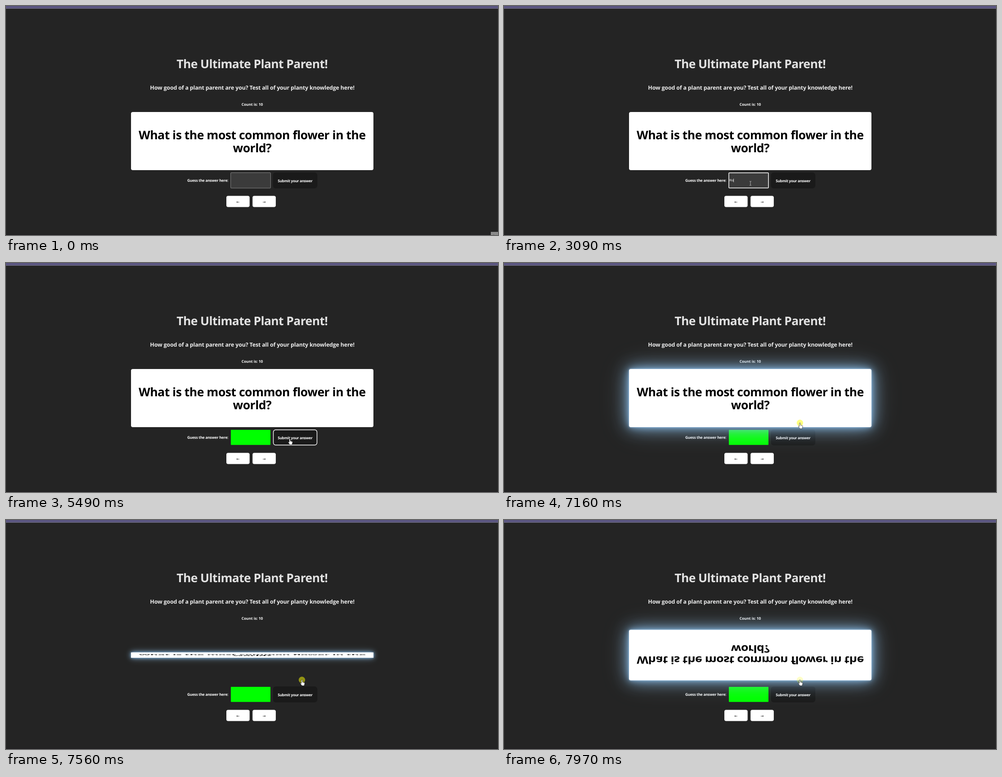
An HTML page for the animation above (8000 ms loop, 1094x512 px).

```html
<!DOCTYPE html>
<html lang="en">
<head>
<meta charset="utf-8">
<title>Plant quiz</title>
<style>
  html, body { margin: 0; width: 100%; height: 100%; overflow: hidden; background: #242424; }
  svg { position: absolute; left: 0; top: 0; width: 1094px; height: 512px; }
  body { font: 700 8.28px "Open Sans", "Noto Sans", sans-serif; text-rendering: geometricPrecision; }
  text { fill: #fff; }
  .mid { text-anchor: middle; }
  #title { font-size: 26.5px; letter-spacing: -.023em; fill: #e2e2e2; }
  #subtitle { font-size: 12.42px; letter-spacing: -.0125em; fill: #eee; }
  #prompt { letter-spacing: -.028em; }
  #submitText { letter-spacing: -.04em; }
  #typed { font: 6.9px "Liberation Sans", sans-serif; }
  .arrow { font: 8.3px "DejaVu Sans", sans-serif; fill: #111; }
  #card {
    position: absolute; left: 277.7px; top: 237px; width: 539.3px; height: 130px;
    box-sizing: border-box; padding-top: 36.5px; border-radius: 4px;
    background: #fff; color: #000; text-align: center;
    font-size: 26.5px; line-height: 29.2px; letter-spacing: -.018em;
  }
</style>
</head>
<body>
<svg>
  <rect width="1094" height="5" fill="#5a5580"/>
  <rect y="5" width="1094" height="1" fill="#77758a"/>
  <rect y="510.5" width="1094" height="1.5" fill="#1e1c1f"/>
  <text id="title" class="mid" x="547.3" y="139.3">The Ultimate Plant Parent!</text>
  <text id="subtitle" class="mid" x="547.6" y="187.3">How good of a plant parent are you? Test all of your planty knowledge here!</text>
  <text class="mid" x="547.5" y="222.5">Count is: 10</text>
  <text id="prompt" x="403" y="393">Guess the answer here:</text>
  <rect id="field" rx="1"/>
  <text id="typed" x="501.2" y="392.4"></text>
  <rect id="caret" y="386" width=".8" height="8" fill="#fff"/>
  <rect id="submit" x="594.5" y="373" width="97" height="34" rx="5" fill="#1a1a1a" stroke-width="1.4"/>
  <text id="submitText" class="mid" x="642.8" y="393.7">Submit your answer</text>
  <rect x="490" y="424.5" width="51.7" height="25" rx="4" fill="#fff"/>
  <rect x="548.2" y="424.5" width="51.7" height="25" rx="4" fill="#fff"/>
  <text class="mid arrow" x="515.7" y="440.6">←</text>
  <text class="mid arrow" x="574" y="440.6">→</text>
</svg>
<div id="card">What is the most common flower in the<br>world?</div>
<svg>
  <g id="tooltip">
    <rect x="1078" y="505" width="16" height="7" fill="#8b8b8b"/>
    <text x="1082" y="516" style="fill:#333">e</text>
  </g>
  <g id="pointer">
    <circle id="press" r="7.2" fill="#ff0"/>
    <path id="arrow" d="M0 0V11L2.6 8.6 4.3 12.4 5.9 11.7 4.2 8H7.8Z" fill="#fff" stroke="#000" stroke-width=".6"/>
    <path id="hand" d="M-1.2 1.2a1.2 1.2 0 0 1 2.4 0V5l4 1q1.2.4 1 1.7l-.6 3.3-.9 2H0L-3.4 8.2q-.3-1.3 1-1.2l1.2.9z" fill="#fff" stroke="#000" stroke-width=".6"/>
    <path id="beam" d="M-2-4.5H-.5L0-4 .5-4.5H2M0-4V4M-2 4.5H-.5L0 4 .5 4.5H2" fill="none" stroke="#c4c4c4" stroke-width=".9"/>
  </g>
</svg>
<script>
const LOOP = 8000;
const FOCUS = 1480, SUBMIT_DOWN = 5160, SUBMIT_UP = 5490, FLIP = 7115, FLIP_TIME = 1600;
const ANSWER = "Roses", KEYS = [2630, 3090, 3360, 3560, 3760];
// Pointer stops: time, x, y
const STOPS = [
  [0, 1094, 512], [810, 592, 443], [880, 587, 438], [1090, 539, 395.5],
  [1819, 539, 395.5], [1820, 548, 396.5], [4610, 548, 396.5],
  [5160, 631, 393], [6420, 631, 393], [6890, 658, 357.5], [LOOP, 658, 357.5]
];

const $ = id => document.getElementById(id);
const clamp = v => Math.min(1, Math.max(0, v));
const show = (id, on) => $(id).style.display = on ? "" : "none";
const set = (id, attrs) => {
  for (const name in attrs) $(id).setAttribute(name, attrs[name]);
};
const inside = ([x, y], left, top, right, bottom) =>
  x >= left && x <= right && y >= top && y <= bottom;

// The CSS "ease" curve: cubic-bezier(.25, .1, .25, 1)
function ease(x) {
  const bezier = (a, b, u) => 3 * a * u * (1 - u) ** 2 + 3 * b * u * u * (1 - u) + u ** 3;
  let low = 0, high = 1;
  for (let i = 0; i < 24; i++) {
    const u = (low + high) / 2;
    if (bezier(.25, .25, u) < x) low = u; else high = u;
  }
  return bezier(.1, 1, low);
}

function pointerAt(t) {
  const i = STOPS.findIndex(stop => stop[0] > t);
  const [t0, x0, y0] = STOPS[i - 1], [t1, x1, y1] = STOPS[i];
  const p = (t - t0) / (t1 - t0), s = p * p * (3 - 2 * p);
  return [x0 + (x1 - x0) * s, y0 + (y1 - y0) * s];
}

function drawField(t) {
  const focused = t >= FOCUS && t < SUBMIT_DOWN, correct = t >= SUBMIT_UP;
  const inset = focused || correct ? .75 : .5;
  set("field", {
    x: 499.2 + inset, y: 372.2 + inset, width: 89.6 - 2 * inset, height: 35.4 - 2 * inset,
    fill: correct ? "#0f0" : "#3b3b3b",
    stroke: correct ? "none" : focused ? "#fff" : "#858585",
    "stroke-width": focused ? 1.5 : 1
  });
  const count = correct ? 0 : KEYS.filter(key => key <= t).length;
  $("typed").textContent = ANSWER.slice(0, count);
  const lastEdit = count ? KEYS[count - 1] : FOCUS;
  show("caret", focused && (t - lastEdit) % 1060 < 530);
  set("caret", { x: 501.2 + (count ? $("typed").getComputedTextLength() : 0) });
}

function drawCard(t) {
  const glow = ease(clamp((t - 6560) / 330));
  const angle = Math.PI * ease(clamp((t - FLIP) / FLIP_TIME));
  $("card").style.transform = `scaleY(${Math.cos(angle)})`;
  $("card").style.boxShadow = [
    `0 0 4px rgba(170,215,255,${.8 * glow})`,
    `0 0 15px rgba(145,200,245,${.65 * glow})`,
    `0 0 36px rgba(135,190,238,${.9 * glow})`,
    `0 0 64px rgba(190,220,245,${.3 * glow})`
  ].join();
}

function drawPointer(t) {
  const at = pointerAt(t);
  const overField = inside(at, 499, 372, 589, 408);
  const overLink = inside(at, 548, 424, 600, 450) || inside(at, 594, 372, 692, 408)
    || inside(at, 277, 237, 817, 367);
  show("pointer", t >= 70);
  set("pointer", { transform: `translate(${at})` });
  show("beam", overField);
  show("hand", overLink);
  show("arrow", !overField && !overLink);
  const pressed = t >= FOCUS && t < 1620 || t >= SUBMIT_DOWN && t < SUBMIT_UP || t >= FLIP;
  set("press", { opacity: pressed ? .5 * clamp((8100 - t) / 300) : 0 });
}

function draw(now) {
  const t = now % LOOP;
  drawField(t);
  drawCard(t);
  drawPointer(t);
  set("submit", { stroke: t >= SUBMIT_DOWN && t < FLIP ? "#fff" : "#1a1a1a" });
  show("tooltip", t < 70);
  requestAnimationFrame(() => draw(performance.now() - start));
}
const start = performance.now();
draw(0);
</script>
</body>
</html>
```
